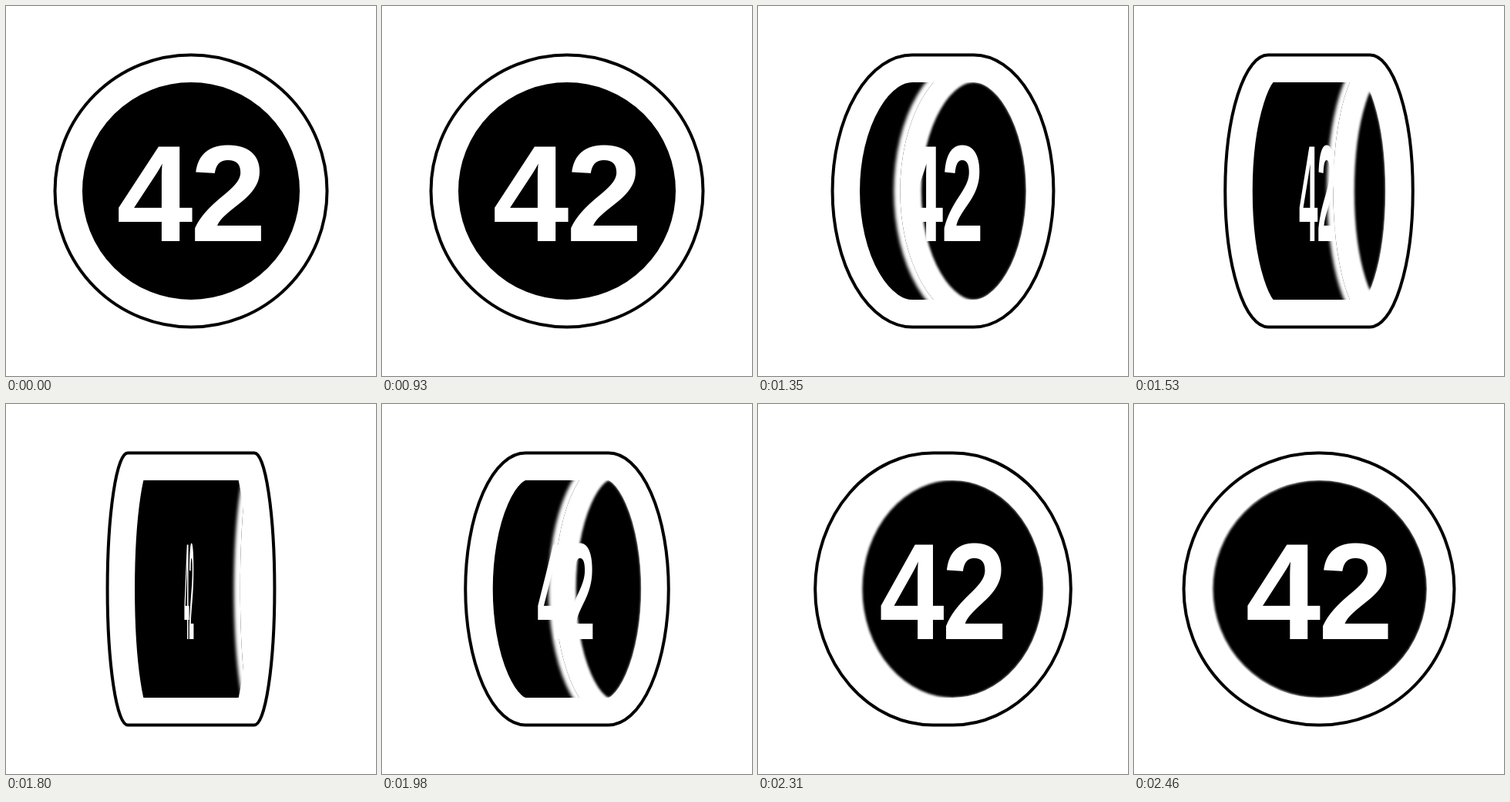
Recreate the animation shown at these times as an HTML page with a canvas. Size 480 px wide and 480 px high, loop 2490 ms.

```html
<!DOCTYPE html>
<html lang="en">
<head>
<meta charset="utf-8">
<title>Turning coin</title>
<style>
  html, body { margin: 0; width: 100%; height: 100%; overflow: hidden; background: #fff; }
  canvas { display: block; }
</style>
</head>
<body>
<canvas id="stage" width="480" height="480"></canvas>
<script>
const ctx = document.getElementById('stage').getContext('2d');
const LOOP = 2490, STEP = 30, HOLD = 930, EDGE_ON = 1715, HALF = 780;
const R = 176.5, DEPTH = 96.5, RIM = 35.5, H = Math.PI / 2;

// 0 = facing us, 1 = edge-on
function turn(t) {
  if (t < HOLD) return 0;
  return Math.max(0, 1 - Math.abs(t - EDGE_ON) / HALF) ** 1.4;
}

// Two discs side by side and everything between them.
function hull(rx, shift) {
  const path = new Path2D();
  path.ellipse(-shift, 0, rx, R, 0, H, 3 * H);
  path.ellipse(shift, 0, rx, R, 0, -H, H);
  path.closePath();
  return path;
}

function disc(rx, ry, x) {
  const path = new Path2D();
  path.ellipse(x, 0, rx, ry, 0, 0, 4 * H);
  return path;
}

function fill(path, color) {
  ctx.fillStyle = color;
  ctx.fill(path);
}

function stroke(path, color, width) {
  ctx.strokeStyle = color;
  ctx.lineWidth = width;
  ctx.stroke(path);
}

// Front disc: black, with a soft white rim of constant width.
function drawFront(rx, shift) {
  const front = disc(rx, R, shift);
  ctx.filter = 'blur(2px)';
  fill(front, '#fff');
  ctx.filter = 'none';
  ctx.clip(disc(Math.max(0, rx - 8), R - 8, shift));
  fill(front, '#000');
  ctx.filter = 'blur(1.5px)';
  stroke(front, '#fff', 2 * RIM);
  ctx.filter = 'none';
}

function draw(t) {
  const u = turn(t);
  const rx = R * (1 - u), shift = DEPTH * u;
  const coin = hull(rx, shift);

  ctx.setTransform(1, 0, 0, 1, 0, 0);
  ctx.fillStyle = '#fff';
  ctx.fillRect(0, 0, 480, 480);
  ctx.translate(240, 240);
  ctx.lineJoin = 'round';

  fill(coin, '#000');
  ctx.save();
  ctx.clip(coin);
  if (u > 0) {
    ctx.save();
    drawFront(rx, shift);
    ctx.restore();
  }
  stroke(coin, '#fff', 2 * RIM);
  ctx.restore();
  stroke(coin, '#000', 4);

  ctx.translate(-3 * u, 0);
  ctx.scale(Math.max(0.01, 1 - 1.1 * u), 1);
  ctx.fillStyle = '#fff';
  ctx.font = 'bold 178px "Liberation Sans", Arial, sans-serif';
  ctx.fillText('4', -96.5, 64.5);
  ctx.fillText('2', -1, 64.5);
}

const start = performance.now();
function tick() {
  const t = (performance.now() - start) % LOOP;
  draw(Math.floor(t / STEP) * STEP);
  requestAnimationFrame(tick);
}
tick();
</script>
</body>
</html>
```
